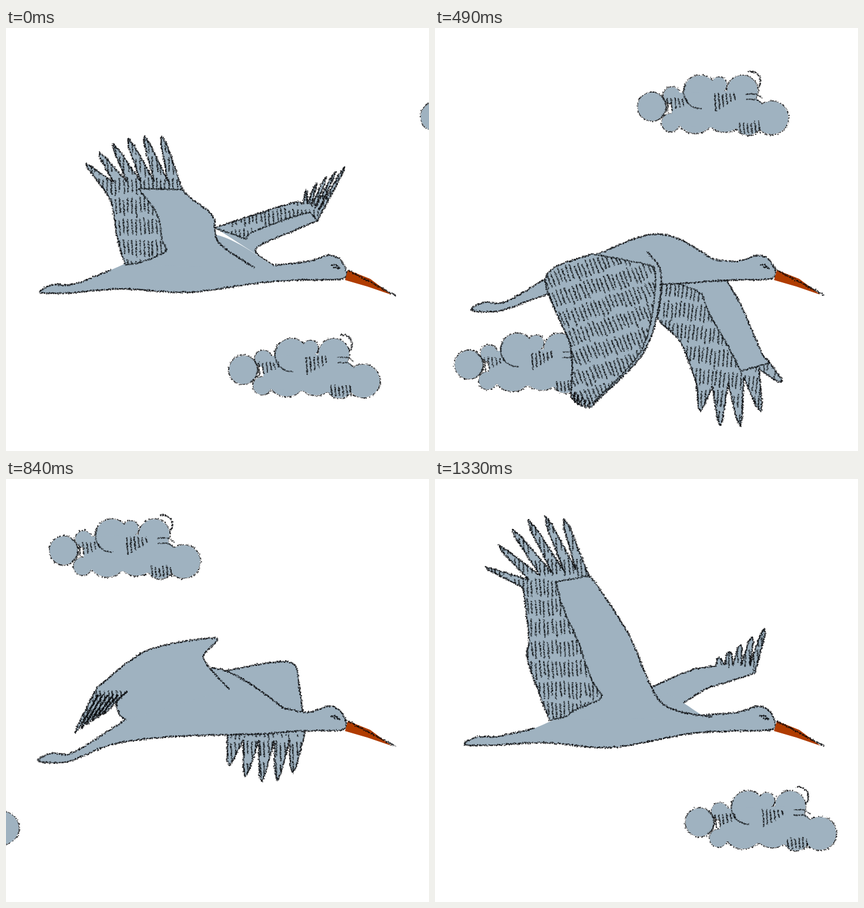
An HTML page with a canvas that plays this animation: 720 px wide and 720 px high, repeating every 1.4 s.

```html
<!DOCTYPE html>
<html lang="en">
<head>
<meta charset="utf-8">
<title>Flying crane</title>
<style>
html, body { margin: 0; height: 100%; overflow: hidden; background: #fff; }
canvas { display: block; width: 100vw; height: 100vh; }
</style>
</head>
<body>
<canvas id="stage" width="720" height="720"></canvas>
<script>
const ctx = document.getElementById('stage').getContext('2d');
const STEP = 70, STEPS = 20, FILL = '#9fb2c0', BEAK_FILL = '#b03c00';

const points = text => text.split(' ').map(p => p.split(',').map(Number));
const lerp = (a, b, u) => a + (b - a) * u;
const lerpPoint = (p, q, u) => [lerp(p[0], q[0], u), lerp(p[1], q[1], u)];
const mix = (a, b, u) => a.map((p, i) => lerpPoint(p, b[i], u));
const shift = ([x, y], dx, dy) => [x + dx, y + dy];
const distance = (p, q) => Math.hypot(q[0] - p[0], q[1] - p[1]);

const HEAD = points('515,397 548,387 567,393 579,413 571,427 500,429 430,434');
const BEAK = points('582,412 577,429 615,440 656,454 620,427');
const BEAK_TIP = [663, 455], EYE = points('553,404 561,403 568,409 558,407');

// Wings hold leading edge, arc of feather tips and trailing edge.
// Cover is the share of each wing that is hatched, tilt the angle of its rows.
const pose = (at, body, near, far, cover, tilt = [0, 0]) =>
  ({ at, body: points(body), near: near.map(points), far: far.map(points), cover, tilt });

// body: tail, rump, back, nape, belly
const poses = [
  pose(0, '58,450 178,412 340,350 455,404 310,450',
    ['422,408 362,365 352,320 315,290 300,275', '265,184 195,192 137,231', '165,272 180,300 190,360 203,403'],
    ['455,404 425,376 490,345 530,328', '577,236 545,254 512,276', '505,300 490,297 410,322 356,340'], [.45, .5]),
  pose(3, '60,460 165,437 368,360 470,400 310,450',
    ['363,385 364,404 350,409 330,405 315,400', '304,363 240,386 196,398', '190,402 188,412 185,420 180,430'],
    ['450,432 530,434 580,441 612,435', '625,404 540,474 480,464', '470,452 458,445 450,440 445,435'], [1, .9]),
  pose(7, '62,480 187,428 370,351 475,394 310,440',
    ['360,380 384,415 378,490 350,560 270,640', '264,646 246,643 234,632', '232,612 230,540 188,425 265,385'],
    ['490,420 520,470 555,550 570,570', '590,603 520,678 452,652', '445,605 418,535 378,490 384,420'], [.95, .6], [-18, 8]),
  pose(9, '53,490 190,422 330,341 450,388 310,440',
    ['375,355 357,385 352,440 315,540 292,600', '287,613 260,615 230,606', '226,598 213,490 176,388 265,360'],
    ['505,390 528,455 545,505 557,585', '552,648 490,660 430,640', '432,600 413,530 385,480 355,430'], [.95, .6], [0, -8]),
  pose(12, '55,480 185,422 345,322 475,391 290,438',
    ['380,358 336,305 357,271 240,292 155,355', '118,432 142,415 165,400', '205,362 188,380 194,402 205,410'],
    ['348,332 480,311 500,360 508,435', '488,500 435,515 380,487', '377,432 372,410 365,385 348,340'], [0, 0]),
  pose(16, '45,460 170,418 340,310 460,396 310,455',
    ['378,370 342,285 341,228 240,158 225,145', '148,101 88,146 80,204', '140,212 173,270 192,350 205,403'],
    ['415,365 435,325 465,305 495,285', '500,268 489,246 479,252', '485,270 440,280 390,292 345,304'], [.5, 0]),
  pose(19, '50,452 170,424 350,355 455,402 300,457',
    ['470,405 385,380 330,265 275,180 262,165', '219,67 145,76 87,150', '150,185 160,270 158,310 195,411'],
    ['418,385 460,358 500,345 545,330', '561,254 520,282 484,304', '478,318 440,324 400,340 360,358'], [.5, 0])
];

// x, y, radius of the circles that make up a cloud
const puffs = [[26, 53, 24], [108, 28, 28], [100, 65, 33], [150, 63, 33], [180, 26, 26], [230, 72, 28],
  [190, 79, 22], [60, 34, 14], [140, 16, 13], [58, 80, 15]];

let seed = 1;
function random() {
  seed = (seed + 0x6D2B79F5) | 0;
  let n = Math.imul(seed ^ (seed >>> 15), 1 | seed);
  n = (n + Math.imul(n ^ (n >>> 7), 61 | n)) ^ n;
  return ((n ^ (n >>> 14)) >>> 0) / 4294967296;
}

// Smooth line through the given points.
function curve(pts, detail = 16, pull = 0.45) {
  const line = [pts[0]];
  for (let i = 0; i < pts.length - 1; i++) {
    const a = pts[i], b = pts[i + 1], before = pts[i - 1] || a, after = pts[i + 2] || b;
    for (let k = 1; k <= detail; k++) {
      const u = k / detail, v = 1 - u;
      line.push([0, 1].map(d => v * v * (1 + 2 * u) * a[d] + u * u * (3 - 2 * u) * b[d]
        + pull * u * v * (v * (b[d] - before[d]) - u * (after[d] - a[d]))));
    }
  }
  return line;
}
const along = (line, u) => line[Math.round(u * (line.length - 1))];

// Charcoal line made of scattered specks.
function pencil(line, spread = 2, alpha = 0.75) {
  ctx.fillStyle = `rgba(8,10,12,${alpha})`;
  for (let i = 1; i < line.length; i++) {
    const count = distance(line[i - 1], line[i]) * 1.4;
    for (let k = random(); k < count; k++) {
      const [x, y] = lerpPoint(line[i - 1], line[i], k / count), size = 0.8 + random() * 1.4;
      const stray = () => (random() + random() - 1) * spread - size / 2;
      ctx.fillRect(x + stray(), y + stray(), size, size);
    }
  }
}

function trace(line) {
  ctx.beginPath();
  for (const p of line) ctx.lineTo(...p);
  ctx.closePath();
}

function fill(line, color = FILL) {
  trace(line);
  ctx.fillStyle = color;
  ctx.fill();
}

// Rows of short strokes inside an outline.
function hatch(outline, tilt) {
  const xs = outline.map(p => p[0]), ys = outline.map(p => p[1]);
  const left = Math.min(...xs), top = Math.min(...ys), angle = tilt * Math.PI / 180;
  const w = (Math.max(...xs) - left) / 2, h = (Math.max(...ys) - top) / 2;
  const lean = Math.abs(Math.sin(angle)), reachX = w + h * lean, reachY = h + w * lean;
  ctx.save();
  trace(outline);
  ctx.clip();
  ctx.translate(left + w, top + h);
  ctx.rotate(angle);
  for (let y = -reachY; y < reachY; y += 35)
    for (let x = -reachX; x < reachX; x += 7) {
      const start = y + random() * 6;
      pencil([[x, start], [x + random() * 3, start + 22 + random() * 8]], 1.6, 0.6);
    }
  ctx.restore();
}

// Feathers from the chord root-end out to an arc through three tips.
function feathers(root, end, [first, middle, last], count) {
  const line = [root], width = distance(root, end), half = Math.min(5, width / count * 0.3);
  const [sx, sy] = [0, 1].map(d => (end[d] - root[d]) / width * half);
  for (let k = 0; k < count; k++) {
    const u = k / (count - 1), base = lerpPoint(root, end, (k + 0.5) / count);
    const tip = [0, 1].map(d => first[d] * (1 - u) * (1 - 2 * u) + middle[d] * 4 * u * (1 - u) + last[d] * u * (2 * u - 1));
    const neck = lerpPoint(base, tip, 0.85);
    const valley = lerpPoint(lerpPoint(root, end, (k + 1) / count), tip, k < count - 1 ? 0.15 : 0);
    line.push(shift(neck, -sx, -sy), tip, shift(neck, sx, sy), valley);
  }
  return line;
}

function drawWing([leadPoints, tips, trailPoints], count, cover, tilt) {
  const lead = curve(leadPoints), trail = curve(trailPoints);
  const fan = feathers(lead.at(-1), trail[0], tips, count);
  const covert = Array.from({ length: 41 }, (_, i) =>
    lerpPoint(along(trail, 1 - i / 40), along(lead, i / 40), cover * Math.min(1, i / 8)));
  fill([...lead, ...fan, ...trail]);
  hatch([...fan, ...trail, ...covert], tilt);
  if (cover) pencil([...covert, lead.at(-1)], 1.7, 0.6);
  [lead, fan, trail].forEach(line => pencil(line));
}

function drawBird(step) {
  const i = poses.findLastIndex(p => p.at <= step), a = poses[i], b = poses[(i + 1) % poses.length];
  const u = (step - a.at) / ((b.at || STEPS) - a.at);
  const wing = side => a[side].map((line, k) => mix(line, b[side][k], u));
  const [nearCover, farCover] = a.cover.map((c, k) => lerp(c, b.cover[k], u));
  const [nearTilt, farTilt] = a.tilt.map((t, k) => lerp(t, b.tilt[k], u));
  const [tail, rump, back, nape, belly] = mix(a.body, b.body, u);
  const near = wing('near');

  const spine = curve([rump, back, nape]);
  const outline = curve([nape, ...HEAD, belly, shift(lerpPoint(tail, belly, 0.55), 0, -6),
    shift(tail, 50, 1), tail, shift(tail, 22, -13), shift(tail, 58, -14), rump]);
  drawWing(wing('far'), 5, farCover, farTilt);
  fill([...spine, ...outline]);
  pencil(outline);
  const lowered = near[1][0][1] > back[1];
  if (lowered) pencil(spine);
  drawWing(near, 6, nearCover, nearTilt);
  pencil(EYE, 2);
  fill(BEAK, BEAK_FILL);
  pencil([BEAK[0], BEAK_TIP]);
}

const arc = ([x, y, r], from = 0, to = 2 * Math.PI) => Array.from({ length: 33 }, (_, k) => {
  const angle = lerp(from, to, k / 32);
  return [x + r * Math.cos(angle), y + r * Math.sin(angle)];
});

function drawCloud(x, y) {
  ctx.save();
  ctx.translate(x, y);
  puffs.forEach(puff => pencil(arc(puff), 3));
  puffs.forEach(puff => fill(arc(puff)));
  fill(points('60,30 190,25 225,60 190,92 60,85'));
  pencil(arc(puffs[0], -1, 1), 1.5, 0.5);
  pencil(arc(puffs[1], 1.5, 3.6), 1.5, 0.5);
  pencil(arc([194, 10, 17], -1.8, 0.8), 2);
  for (const bend of [32, 41]) pencil(curve(points(`186,${bend} 203,${bend} 214,${bend + 7}`)), 1.3, 0.5);
  for (const [left, top, length, taper] of [[52, 38, 25, 3], [133, 29, 32, 4], [175, 78, 20, 0]])
    for (let k = 0; k < 6; k++) {
      const sx = left + k * 6.5;
      pencil([[sx, top + random() * 4], [sx + 2, top + length - k * taper]], 1.6, 0.65);
    }
  ctx.restore();
}

// Steps counted from zero, with the last few before the loop's end as negatives.
const wrap = (step, lead) => (step + lead) % STEPS - lead;

function drawClouds(step) {
  const high = wrap(step, 1), low = wrap(step, 7);
  drawCloud(704 - 50 * high - 0.22 * high ** 2, 98 - 2.45 * high);
  drawCloud(378 - 47 * low - 0.35 * low ** 2, 520 + 0.14 * (low - 8) ** 2);
}

let shown = -1;
function play(now) {
  const step = Math.floor(now / STEP) % STEPS;
  if (step !== shown) {
    shown = step;
    seed = step * 977 + 1;
    ctx.fillStyle = '#fff';
    ctx.fillRect(0, 0, 720, 720);
    drawClouds(step);
    drawBird(step);
  }
  requestAnimationFrame(play);
}
play(0);
</script>
</body>
</html>
```
